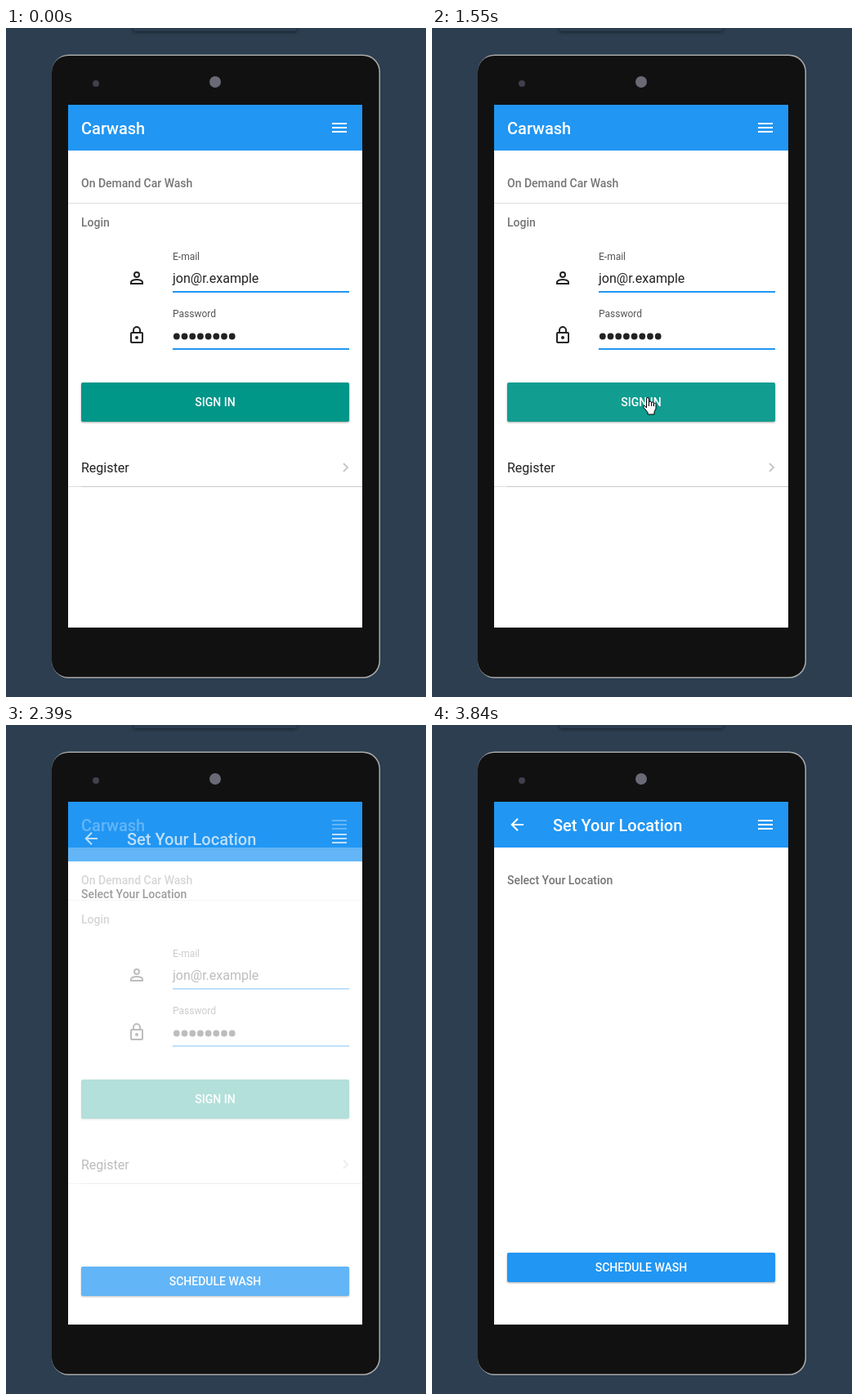
Write an HTML page that moves like this. It is 514 px wide and 819 px high and loops after 8000 ms.

```html
<!DOCTYPE html>
<html lang="en">
<head>
<meta charset="utf-8">
<title>Car wash sign-in</title>
<style>
  html, body { margin: 0; width: 100%; height: 100%; overflow: hidden; background: #2c3e50; }
  svg { display: block; }
  text { font: 16px Roboto, sans-serif; fill: #222; white-space: pre; }
  .title { font-size: 20px; font-weight: 500; fill: #fff; }
  .head { font-size: 14px; font-weight: 500; fill: #757575; }
  .label { font-size: 12px; fill: #555; }
  .caption { font-size: 14px; font-weight: 500; fill: #fff; text-anchor: middle; }
  .raised { filter: drop-shadow(0 1px 1px rgba(0, 0, 0, .35)); }
  .shade { filter: drop-shadow(0 1px 2px rgba(0, 0, 0, .5)); }
  .pointer path { fill: #fff; stroke: #000; stroke-linejoin: round; }
</style>
</head>
<body>
<svg width="514" height="819" viewBox="0 0 514 819">
  <defs>
    <g id="bar">
      <path fill="#2196f3" d="M76 94h360v56H76z"/>
      <path fill="#fff" d="M399 116h18v2h-18zm0 5h18v2h-18zm0 5h18v2h-18z"/>
    </g>
  </defs>

  <rect class="shade" x="156" y="-10" width="200" height="14" rx="3" fill="#2c3e50"/>
  <rect x="56" y="32.5" width="402" height="763.5" rx="21" fill="#aaa"/>
  <rect x="56" y="34" width="400.5" height="760.5" rx="20" fill="#111"/>
  <circle cx="256" cy="66" r="7" fill="#6a6a76"/>
  <circle cx="110" cy="68" r="4" fill="#40404d"/>

  <svg x="76" y="94" width="360" height="640" viewBox="76 94 360 640">
    <path fill="#fff" d="M76 94h360v640H76z"/>
    <use href="#bar"/>
    <text class="title" x="92" y="130">Carwash</text>
    <text class="head" x="92" y="195">On Demand Car Wash</text>
    <path fill="#dedede" d="M76 214h360v1H76zm0 347h360v1H76z"/>
    <text class="head" x="92" y="243">Login</text>

    <text class="label" x="204" y="284">E-mail</text>
    <text x="204" y="312">jon@r.example</text>
    <text class="label" x="204" y="354">Password</text>
    <g id="dots" fill="#222"></g>
    <path fill="#2196f3" d="M204 322h216v2H204zm0 70h216v2H204z"/>
    <g fill="none" stroke="#222" stroke-width="2">
      <circle cx="160" cy="302" r="3"/>
      <path d="M153 313v-2c0-2 4-3.1 7-3.1s7 1.1 7 3.1v2z"/>
      <rect x="153" y="373" width="14" height="12" rx="1"/>
      <path d="M156 373v-3a4 4 0 0 1 8 0v3"/>
    </g>
    <circle cx="160" cy="379" r="2" fill="#222"/>

    <rect id="signIn" class="raised" x="92" y="434" width="328" height="48" rx="2"/>
    <text class="caption" x="256" y="463">SIGN IN</text>
    <text x="92" y="544">Register</text>
    <path d="M413 533l5 5-5 5" fill="none" stroke="#c8c8c8" stroke-width="2"/>
    <path fill="#c8c8c8" d="M92 561h344v1H92z"/>

    <g id="next">
      <path fill="#fff" d="M76 94h360v640H76z"/>
      <use href="#bar"/>
      <path d="M112 122H98m7-7.3-7.3 7.3 7.3 7.3" fill="none" stroke="#fff" stroke-width="2"/>
      <text class="title" x="148" y="130">Set Your Location</text>
      <text class="head" x="92" y="195">Select Your Location</text>
      <rect class="raised" x="92" y="646" width="328" height="36" rx="2" fill="#2196f3"/>
      <text class="caption" x="256" y="669">SCHEDULE WASH</text>
    </g>
  </svg>

  <g class="pointer">
    <path id="arrow" d="M.5.5v16L4 13l2.5 5.5 2.5-1L6.7 12h4.8z"/>
    <path id="hand" d="M4.5 13V2a1.5 1.5 0 0 1 3 0v9V6.5a1.5 1.5 0 0 1 3 0V11V7.2a1.4 1.4 0 0 1 2.8 0V11V8.6a1.3 1.3 0 0 1 2.7 0V14l-2 4v3H6v-2.5l-5-6q-.5-2.5 1.5-2z"/>
  </g>
</svg>
<script>
const LOOP = 8000;
const $ = id => document.getElementById(id);
const mix = (a, b, p) => a + (b - a) * p;

for (let i = 0; i < 8; i++) {
  $('dots').innerHTML += `<circle cx="${208.8 + i * 9.7}" cy="377.5" r="3.9"/>`;
}

// Progress that advances in even time steps, holding each value.
function stepped(t, start, end, values) {
  if (t < start) return 0;
  const last = values.length - 1;
  return values[Math.min(last, Math.floor((t - start) / (end - start) * last + 0.01))];
}

function place(id, pos) {
  $(id).setAttribute('visibility', pos ? 'visible' : 'hidden');
  if (pos) $(id).setAttribute('transform', `translate(${pos})`);
}

function arrowAt(t, move) {
  if (t >= 210 && t < 630 && move < 0.9) {
    return [Math.round(mix(380, 261, move)), Math.round(mix(735, 452, move))];
  }
  if (t >= 2310 && t < 2390) return [372, 494];
  if (t >= 3760 && t < 3840) return [261, 11];
}

function draw(t) {
  const move = stepped(t, 210, 630, [0, 0.3, 0.6, 0.8, 0.94, 1]);
  place('arrow', arrowAt(t, move));
  place('hand', move >= 0.9 && t < 2310 &&
    [Math.round(mix(380, 258, move)), Math.round(mix(735, 452, move))]);

  // Pressing the button mixes white into its colour.
  const press = t < 1930 ? stepped(t, 1330, 1620, [0.003, 0.02, 0.045, 0.065, 0.08])
    : t < 2310 ? 0.04 : 0;
  const rgb = [0, 150, 136].map(c => Math.round(mix(c, 255, press)));
  $('signIn').setAttribute('fill', `rgb(${rgb})`);

  const enter = stepped(t, 2310, 2620, [0.15, 0.7, 0.91, 0.97, 1]);
  $('next').setAttribute('opacity', enter);
  $('next').setAttribute('transform', `translate(0 ${Math.round(56 * (1 - enter))})`);
}

const begin = performance.now();
function tick() {
  draw((performance.now() - begin) % LOOP);
  requestAnimationFrame(tick);
}
tick();
</script>
</body>
</html>
```
